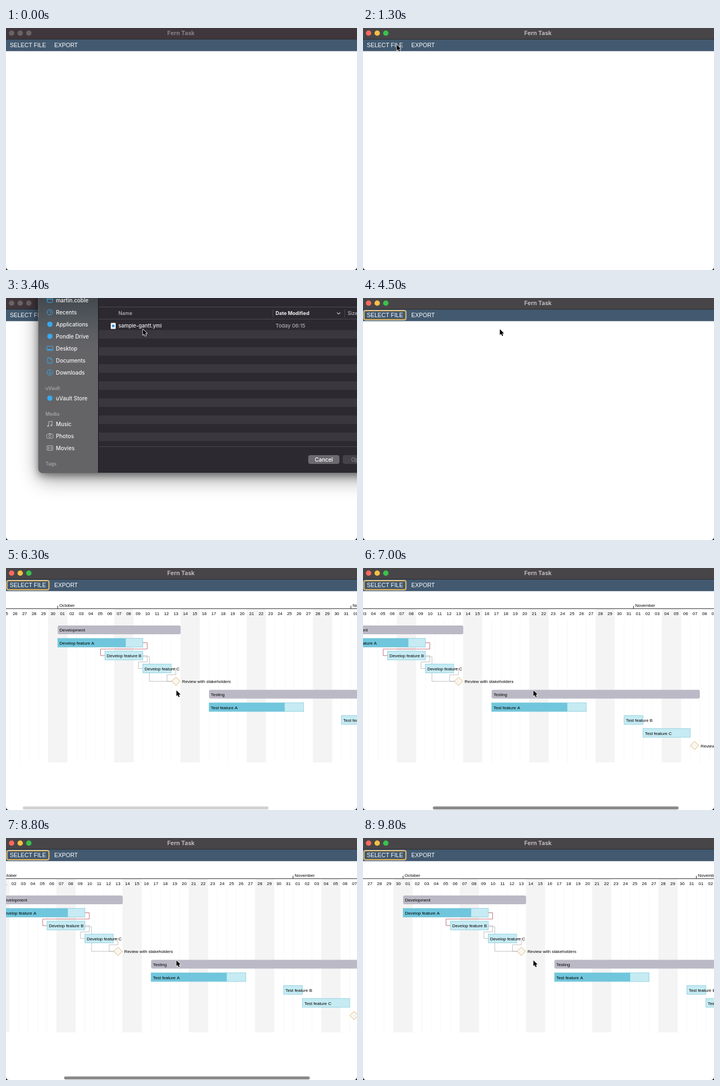
Write an HTML page with a canvas that moves like this. It is 640 px wide and 442 px high and loops after 9.9 s.

```html
<!DOCTYPE html>
<html lang="en">
<head>
<meta charset="utf-8">
<title>Fern Task</title>
<style>
html, body { margin: 0; width: 640px; height: 442px; overflow: hidden; background: #fff; }
canvas { display: block; width: 640px; height: 442px; }
</style>
</head>
<body>
<canvas id="stage"></canvas>
<script>
const W = 640, H = 442, LOOP = 9900, STEP = 100;
const DAY = 17.25, ORIGIN = 134.5, AXIS = 74.2;
const SANS = '"Liberation Sans", Arial, sans-serif';
const UI = 'Inter, Roboto, sans-serif';
const canvas = document.getElementById('stage');
const g = canvas.getContext('2d');
const dpr = window.devicePixelRatio || 1;
canvas.width = W * dpr;
canvas.height = H * dpr;

const clamp = v => Math.max(0, Math.min(1, v));
const smooth = u => u * u * (3 - 2 * u);
const linear = u => u;

// keys: [time, value, easing towards this key]
function track(keys, t) {
  if (t <= keys[0][0]) return keys[0][1];
  for (let i = 1; i < keys.length; i++) {
    const [t0, v0] = keys[i - 1], [t1, v1, ease = linear] = keys[i];
    if (t < t1) return v0 + (v1 - v0) * ease(clamp((t - t0) / (t1 - t0)));
  }
  return keys[keys.length - 1][1];
}

function rect(x, y, w, h, fill) {
  g.fillStyle = fill;
  g.fillRect(x, y, w, h);
}

function paint(fill, stroke, lw) {
  if (fill) { g.fillStyle = fill; g.fill(); }
  if (stroke) { g.strokeStyle = stroke; g.lineWidth = lw; g.stroke(); }
}

function round(x, y, w, h, r, fill, stroke, lw = 1) {
  g.beginPath();
  g.roundRect(x, y, w, h, r);
  paint(fill, stroke, lw);
}

function circle(x, y, r, fill, stroke, lw = 1) {
  g.beginPath();
  g.arc(x, y, r, 0, Math.PI * 2);
  paint(fill, stroke, lw);
}

function line(pts, color, lw = 1) {
  g.beginPath();
  pts.forEach(([x, y]) => g.lineTo(x, y));
  paint(null, color, lw);
}

function text(s, x, y, font, fill, align = 'left') {
  g.font = font;
  g.fillStyle = fill;
  g.textAlign = align;
  g.fillText(s, x, y);
}

function drawWindow(active, ring) {
  rect(0, 0, W, 20.5, active ? '#484548' : '#40373c');
  rect(0, 20, W, 1, '#2c2c30');
  rect(0, 21, W, 21.3, '#42596f');
  const lights = active ? ['#f9695c', '#f6bf45', '#3bc14b'] : ['#6b6266', '#6b6266', '#6b6266'];
  lights.forEach((c, i) => circle(10.2 + i * 15.7, 9.4, 4.9, c));
  text('Fern Task', 319, 13, 'bold 10.5px ' + UI, active ? '#bdb9bc' : '#8b8287', 'center');
  if (ring) {
    round(1.2, 22.5, 77.6, 17.8, 3, null, '#f3e6cc', 1);
    round(2.3, 23.6, 75.4, 15.6, 2.4, null, '#e0a53a', 1.4);
  }
  text('SELECT FILE', 7, 35.2, '10.5px ' + SANS, '#fff');
  text('EXPORT', 88, 35.2, '10.5px ' + SANS, '#fff');
}

const LABEL = '7.9px ' + SANS;

function drawChart(scroll, barAlpha) {
  const x0 = ORIGIN - scroll;
  const at = d => x0 + d * DAY;
  const first = -6, last = 42, end = 42.85;

  for (let d = -1; d <= last; d += 7) {
    rect(at(d), 75, (Math.min(d + 2, end) - d) * DAY, 280, '#f4f4f4');
  }
  for (let d = first; d <= last; d++) {
    line([[at(d), 92], [at(d), 355]], '#f4f4f4', 0.7);
    const n = d < 0 ? 31 + d : d < 31 ? d + 1 : d - 30;
    text(String(n).padStart(2, '0'), at(d + 0.5), 86.2, LABEL, '#000', 'center');
  }

  line([[at(first), 69], [at(first), AXIS], [at(end), AXIS], [at(end), 69]], '#222');
  [['October', 0], ['November', 31]].forEach(([name, d]) => {
    line([[at(d), 69], [at(d), AXIS]], '#222');
    text(name, at(d) + 3, 71, LABEL, '#000');
  });

  const link = (color, ...pts) => line(pts.map(([d, dx, y]) => [at(d) + dx, y]), color, 0.9);
  link('#b9606b', [9, 0, 136.5], [9, 8, 136.5], [9, 8, 148], [5, -8, 148], [5, -8, 160], [5, 0, 160]);
  link('#b8b8bc', [9, 0, 160], [9, 8, 160], [9, 8, 171.5], [9, -8, 171.5], [9, -8, 183.5], [9, 0, 183.5]);
  link('#b8b8bc', [9, 0, 162], [9, 12, 162], [9, 12, 207], [12, 1, 207]);
  link('#b8b8bc', [12, 0, 183.5], [12, 8.5, 183.5], [12, 8.5, 195], [12, -7.5, 195], [12, -7.5, 207], [12, 1, 207]);

  const group = (name, a, b, y) => {
    round(at(a), y, (b - a) * DAY, 16, 3, '#bbb9c5');
    text(name, at(a) + 3.4, y + 11.4, LABEL, '#000');
  };
  const task = (name, a, b, y, done = 0) => {
    const w = (b - a) * DAY;
    rect(at(a), y, w, 16, '#c6ebf3');
    rect(at(a), y, w * done, 16, '#70c6dc');
    g.strokeStyle = '#86cbdc';
    g.lineWidth = 0.8;
    g.strokeRect(at(a), y, w, 16);
    text(name, at(a) + 3.4, y + 11.4, LABEL, '#000');
  };
  const review = (d, y) => {
    const x = at(d), r = 7.7;
    g.beginPath();
    g.moveTo(x, y - r);
    g.lineTo(x + r, y);
    g.lineTo(x, y + r);
    g.lineTo(x - r, y);
    g.closePath();
    paint('#f8f6f3', '#e2b46c', 1);
    text('Review with stakeholders', x + 11.2, y + 3.2, LABEL, '#000');
  };
  group('Development', 0, 13, 105);
  task('Develop feature A', 0, 9, 128.4, 0.8);
  task('Develop feature B', 5, 9, 151.9);
  task('Develop feature C', 9, 12, 175.5);
  review(12.5, 207);
  group('Testing', 16, 38, 222.5);
  task('Test feature A', 16, 26, 246.1, 0.8);
  task('Test feature B', 30, 32, 269.6);
  task('Test feature C', 32, 37, 293.1);
  review(37.45, 324.3);

  if (barAlpha > 0) {
    g.globalAlpha = barAlpha;
    round(1.9 + scroll * 0.713, 435.6, 448, 5.4, 2.7, '#8a8a8a');
    g.globalAlpha = 1;
  }
}

const BLUE = '#38a9ee', PALE = '#b4b3b6';
const icons = {
  folder(y) { round(75, y - 4, 10, 8, 1.5, null, BLUE); line([[75, y - 1.5], [85, y - 1.5]], BLUE); },
  clock(y) { circle(80, y, 5, null, BLUE); line([[80, y - 3], [80, y], [82.4, y]], BLUE); },
  dot(y) { circle(80, y, 4.8, BLUE); },
  screen(y) { round(74.5, y - 4, 11, 8, 1.2, null, BLUE); rect(75.5, y + 1.3, 9, 1.7, BLUE); },
  page(y) {
    line([[76, y - 5], [81, y - 5], [84, y - 2], [84, y + 5], [76, y + 5], [76, y - 5]], BLUE);
    line([[81, y - 5], [81, y - 2], [84, y - 2]], BLUE);
  },
  down(y) {
    circle(80, y, 5, null, BLUE);
    line([[80, y - 3], [80, y + 2.5]], BLUE);
    line([[77.8, y + 0.4], [80, y + 2.6], [82.2, y + 0.4]], BLUE);
  },
  note(y) {
    line([[78, y + 3.5], [78, y - 4], [84, y - 5], [84, y + 2.5]], PALE, 1.2);
    circle(76.7, y + 3.7, 1.6, PALE);
    circle(82.7, y + 2.7, 1.6, PALE);
  },
  camera(y) {
    round(74.3, y - 3.2, 11.4, 7.6, 1.3, null, PALE);
    rect(78, y - 5, 4, 1.8, PALE);
    circle(80, y + 0.6, 2.1, null, PALE);
  },
  film(y) {
    round(74.5, y - 4.3, 11, 8.6, 1.2, null, PALE);
    line([[77, y - 4], [77, y + 4]], PALE);
    line([[83, y - 4], [83, y + 4]], PALE);
    line([[77, y], [83, y]], PALE);
  }
};

const sidebar = [
  ['martin.coble', 4, 'folder'], ['Recents', 26, 'clock'], ['Applications', 48, 'dot'],
  ['Pondle Drive', 70, 'dot'], ['Desktop', 92, 'screen'], ['Documents', 114, 'page'],
  ['Downloads', 136, 'down'], ['uVault', 165], ['uVault Store', 183, 'dot'],
  ['Media', 212], ['Music', 230, 'note'], ['Photos', 252, 'camera'],
  ['Movies', 274, 'film'], ['Tags', 303]
];

function panel(fill, stroke) {
  round(59, -120, 700, 439.5, 8, fill, stroke, 0.8);
}

function drawDialog(alpha) {
  if (alpha <= 0) return;
  g.save();
  g.globalAlpha = alpha;
  g.save();
  [[36, 11, 0.4], [14, 5, 0.4]].forEach(([blur, dy, dark]) => {
    g.shadowColor = `rgba(0,0,0,${dark})`;
    g.shadowBlur = blur * dpr;
    g.shadowOffsetY = dy * dpr;
    panel('#2c2930');
  });
  g.restore();

  g.save();
  panel();
  g.clip();
  const shade = g.createLinearGradient(0, 0, 0, 90);
  shade.addColorStop(0, '#42484e');
  shade.addColorStop(0.45, '#53585d');
  shade.addColorStop(1, '#646467');
  rect(59, 0, 109, 320, shade);
  rect(168, 0, 1, 320, '#141316');

  for (let y = 58.6; y < 271; y += 31.2) {
    rect(169, y, 471, Math.min(15.6, 271 - y), '#3a373e');
  }
  [16.5, 38.5, 271.5].forEach(y => line([[169, y], [W, y]], '#4d4a51'));
  [486, 617].forEach(x => line([[x + 0.5, 21], [x + 0.5, 35]], '#4d4a51'));
  g.restore();
  panel(null, '#77777a');

  sidebar.forEach(([name, y, icon]) => {
    if (icon) {
      icons[icon](y);
      text(name, 91, y + 3.6, '500 9.9px ' + UI, '#f4f4f5');
    } else {
      text(name, 72, y + 3.4, '600 8.6px ' + UI, '#a3a2a5');
    }
  });

  text('Name', 205, 31, '500 9px ' + UI, '#bdbbc0');
  text('Date Modified', 491.5, 31, 'bold 9px ' + UI, '#f0eff1');
  line([[603.5, 26.5], [606.5, 29.5], [609.5, 26.5]], '#c9c8cb', 1.1);
  text('Size', 623, 31, '500 9px ' + UI, '#bdbbc0');
  round(191, 45.5, 9, 11, 1, '#f3f5f7');
  rect(193.3, 48.7, 4.4, 4.6, '#3b8fd0');
  text('sample-gantt.yml', 205, 54, '500 9.4px ' + UI, '#f0eff1');
  text('Today 06:15', 491.5, 54, '500 9.4px ' + UI, '#aeacb1');

  round(551, 287, 57, 16, 4, '#6c6a70');
  text('Cancel', 579.5, 298.7, '500 10px ' + UI, '#fff', 'center');
  round(614, 287, 57, 16, 4, '#454249');
  text('Open', 642, 298.7, '500 10px ' + UI, '#838087', 'center');
  g.restore();
}

function drawCursor(x, y) {
  const pts = [[0, 0], [0, 10.6], [2.4, 8.4], [4.1, 12.2], [6, 11.4], [4.4, 7.7], [7.6, 7.6]];
  g.beginPath();
  pts.forEach(([dx, dy]) => g.lineTo(x + dx, y + dy));
  g.closePath();
  g.lineJoin = 'round';
  paint(null, '#fff', 1.6);
  paint('#000');
  g.lineJoin = 'miter';
}

function drawCorners() {
  [[0, 1], [W, -1]].forEach(([x, side]) => {
    g.beginPath();
    g.moveTo(x, H - 6);
    g.quadraticCurveTo(x, H, x + side * 6, H);
    g.lineTo(x, H);
    paint('#111');
  });
}

const scrollKeys = [[5000, 0], [5800, 40.3, smooth], [6400, 40.3], [7450, 264, smooth],
  [8300, 264], [9200, 61.4, smooth]];
const barKeys = [[4900, 0], [5000, 1], [6100, 1], [6300, 0.38], [6400, 0.38], [6500, 1],
  [7950, 1], [8200, 0], [8300, 0], [8400, 1], [9550, 1], [9800, 0]];
const dialogKeys = [[1300, 0], [1500, 1], [3600, 1], [3900, 0]];
const cursorX = [[100, 632], [1000, 61.5, smooth], [2000, 61.5], [3000, 249.5, smooth],
  [4500, 249.5], [4800, 310.7, smooth]];
const cursorY = [[100, 368], [1000, 30.5, smooth], [2000, 30.5], [3000, 57, smooth],
  [4500, 57], [4800, 223.5, smooth]];

function draw(t) {
  g.setTransform(dpr, 0, 0, dpr, 0, 0);
  rect(0, 0, W, H, '#fff');
  if (t >= 4600) drawChart(track(scrollKeys, t), track(barKeys, t));
  const active = (t >= 1000 && t < 1400) || t >= 4000;
  drawWindow(active, t >= 4100);
  drawDialog(track(dialogKeys, t));
  drawCorners();
  if (t >= 100) drawCursor(track(cursorX, t), track(cursorY, t));
}

const start = performance.now();
function tick() {
  const t = (performance.now() - start) % LOOP;
  draw(Math.floor(t / STEP) * STEP);
  requestAnimationFrame(tick);
}
tick();
</script>
</body>
</html>
```
